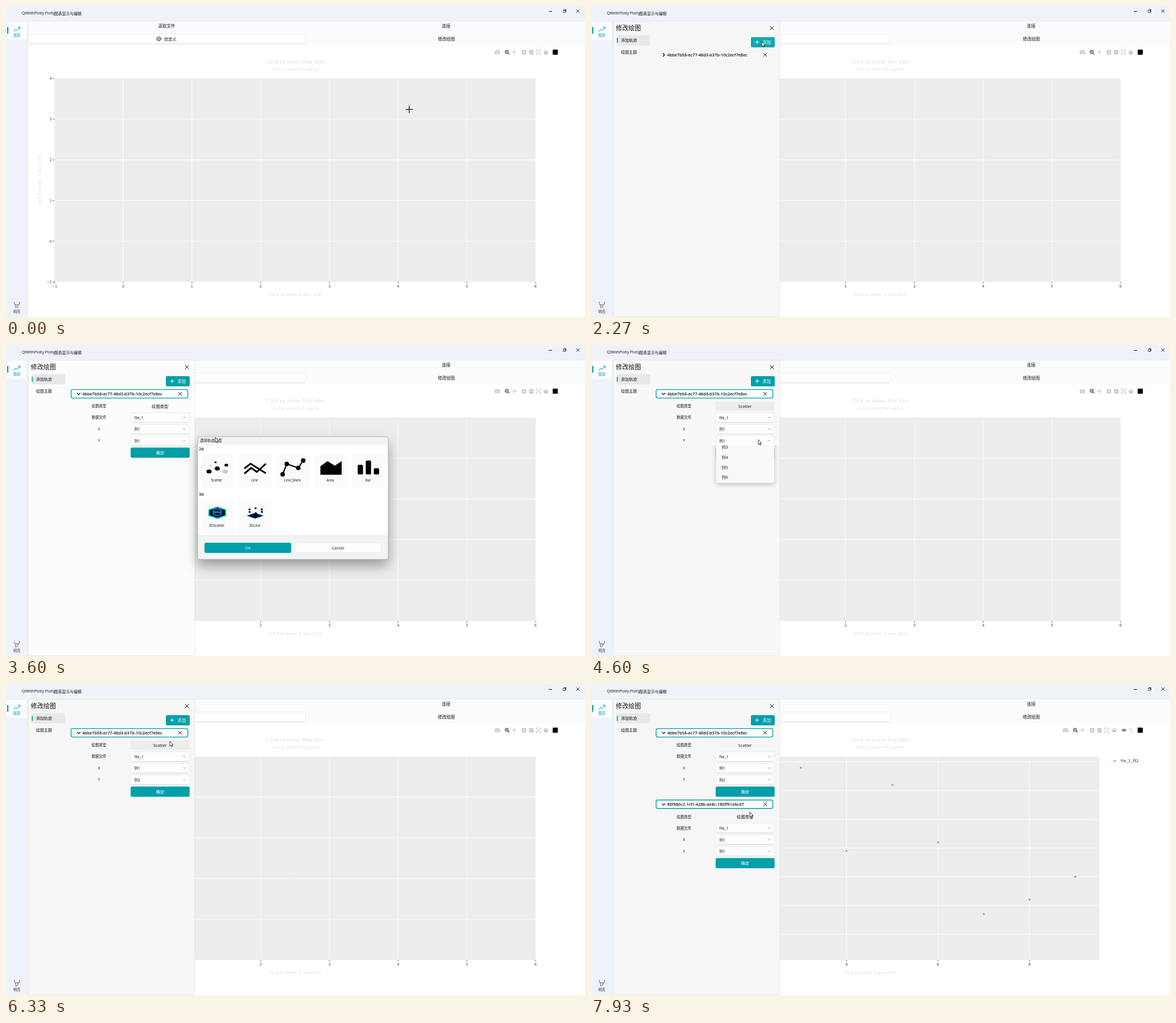
Animation, 1021 px wide and 549 px high, one loop 8 s. Source, as an HTML page with a canvas:

```html
<!DOCTYPE html>
<html lang="zh">
<head>
<meta charset="utf-8">
<title>QtWithPlotly</title>
<style>
  html, body { margin: 0; width: 100%; height: 100%; overflow: hidden; background: #fff; }
  canvas { display: block; width: 100%; height: 100%; }
</style>
</head>
<body>
<canvas id="stage" width="1021" height="549"></canvas>
<script>
const ctx = document.getElementById('stage').getContext('2d');
const DURATION = 8000;
const UI = '"Open Sans","Noto Sans","Noto Sans CJK SC",sans-serif';
const CHART = '"DejaVu Sans","Noto Sans CJK SC",sans-serif';
const INK = '#111', TEAL = '#009faa', TEAL_HOVER = '#0ba8b2', FAINT = '#dedede';

const PANEL_OPEN = 917, ADD_FIRST = 2270, EXPAND_FIRST = 2670, DIALOG_OPEN = 3270,
  DIALOG_CLOSE = 4050, MENU_OPEN = 4506, MENU_CLOSE = 5400, DATA_SHOWN = 6600,
  ADD_SECOND = 7070, EXPAND_SECOND = 7500;

// Pointer gestures: start time, end time, destination.
const POINTER_START = [711, 182];
const GESTURES = [
  [130, 730, 784, 57], [866, 930, 526, 88], [930, 1400, 57, 61], [1730, 2130, 301, 63],
  [2300, 2530, 262, 90], [2700, 3130, 288, 107], [3300, 3600, 369, 163], [3640, 3900, 428, 356],
  [4000, 4350, 295, 167], [4930, 5250, 273, 203], [5500, 5720, 272, 191], [5870, 6330, 289, 101],
  [6470, 6930, 300, 62], [7100, 7400, 268, 211], [7560, 7930, 280, 226]
];

const easeOut = (t, start, length, power = 2) =>
  1 - (1 - Math.min(1, Math.max(0, (t - start) / length))) ** power;
const pointerAt = t => GESTURES.reduce(([x, y], [start, end, toX, toY]) => {
  const p = easeOut(t, start, end - start);
  return [x + (toX - x) * p, y + (toY - y) * p];
}, POINTER_START);
const during = (t, start, end) => t >= start && t < end;
const inside = ([px, py], x, y, w, h) => px >= x && px <= x + w && py >= y && py <= y + h;

function text(s, x, y, size, { color = INK, align = 'left', weight = 400, font = UI } = {}) {
  ctx.font = `${weight} ${size}px ${font}`;
  ctx.textAlign = align;
  ctx.fillStyle = color;
  ctx.fillText(s, x, y + size * 0.37);
}
const centered = (s, x, y, size, color = INK) => text(s, x, y, size, { color, align: 'center' });
const chartText = (s, x, y, size, color = '#444', align = 'center') =>
  text(s, x, y, size, { color, align, font: CHART });

function paint({ fill, stroke, width = 1 }) {
  if (fill) { ctx.fillStyle = fill; ctx.fill(); }
  if (stroke) { ctx.strokeStyle = stroke; ctx.lineWidth = width; ctx.stroke(); }
}
function rect(x, y, w, h, fill, radius = 0, stroke, width = 0.7) {
  ctx.beginPath();
  ctx.roundRect(x, y, w, h, radius);
  paint({ fill, stroke, width });
}
function path(points, style) {
  ctx.beginPath();
  points.forEach(([x, y]) => ctx.lineTo(x, y));
  if (style.close) ctx.closePath();
  paint(style);
}
function ellipse(x, y, rx, ry, style) {
  ctx.beginPath();
  ctx.ellipse(x, y, rx, ry, 0, 0, Math.PI * 2);
  paint(style);
}
const dot = (x, y, r, fill) => ellipse(x, y, r, r, { fill });
const ring = (x, y, r, stroke, width) => ellipse(x, y, r, r, { stroke, width });
const line = (x1, y1, x2, y2, stroke, width) => path([[x1, y1], [x2, y2]], { stroke, width });
function plus(x, y, r, color = INK, width = 1) {
  line(x - r, y, x + r, y, color, width);
  line(x, y - r, x, y + r, color, width);
}
function cross(x, y, r, color = INK, width = 1) {
  line(x - r, y - r, x + r, y + r, color, width);
  line(x - r, y + r, x + r, y - r, color, width);
}
function chevron(x, y, r, down, stroke = '#777', width = 0.8) {
  const h = r / 2;
  path(down ? [[x - r, y - h], [x, y + h], [x + r, y - h]] : [[x - h, y - r], [x + h, y], [x - h, y + r]],
    { stroke, width });
}
function isolated(draw) {
  ctx.save();
  draw();
  ctx.restore();
}
function clipped(x, y, w, h, draw) {
  isolated(() => {
    ctx.beginPath();
    ctx.rect(x, y, w, h);
    ctx.clip();
    draw();
  });
}
function shadowed(blur, offset, alpha, draw) {
  isolated(() => {
    ctx.shadowColor = `rgba(0,0,0,${alpha})`;
    ctx.shadowBlur = blur;
    ctx.shadowOffsetY = offset;
    draw();
  });
}
function primaryButton(label, x, y, w, hovered) {
  rect(x, y, w, 18, hovered ? TEAL_HOVER : TEAL, 2.5);
  centered(label, x + w / 2, y + 9, 7.4, '#fff');
}

function drawWindow() {
  rect(0, 0, 1021, 549, '#eff3f9');
  text('QtWithPlotly Plotly', 28, 13, 6.7);
  text('图表显示与编辑', 85, 13, 6.9);
  line(957, 9.5, 963, 9.5, INK);
  rect(982.5, 7.5, 4, 4, null, 0.5, INK, 0.8);
  path([[983.5, 6.2], [987.5, 6.2], [987.5, 10.5]], { stroke: INK, width: 0.8 });
  cross(1008.5, 9, 2.8);

  rect(2, 28, 34.5, 31.5, '#fcfdfe', 3);
  rect(2, 37, 2.2, 12, TEAL, 1);
  path([[13.5, 45], [17, 41], [20, 43.2], [24.5, 37.5]], { stroke: TEAL });
  path([[21, 37.3], [24.7, 37.3], [24.7, 41]], { stroke: TEAL });
  centered('图表', 19.3, 52, 6.3, TEAL);
  path([[14.5, 522], [15.5, 527.5], [23, 527.5], [24, 522]], { stroke: '#444', width: 0.8 });
  path([[17, 528], [17, 533], [21, 531], [21, 528]], { stroke: '#444', width: 0.8 });
  centered('明亮', 19, 539.5, 6.3, '#333');

  rect(39, 26.5, 990, 530, '#f9fbfd', 4, '#e5e8ec', 0.8);
  rect(39.5, 70, 982, 480, '#fff');
  rect(39.5, 49.5, 489, 17, '#fff', 2.5, '#e2e4e7');
  line(41, 66.6, 527, 66.6, '#d2d4d6', 0.6);
  centered('读取文件', 283.3, 35.7, 7.5);
  centered('连接', 776.3, 35.7, 7.5);
  centered('修改绘图', 776.4, 58, 7.5);
  text('自定义', 278.5, 58, 7.4);
  ctx.setLineDash([1.7, 1.1]);
  ring(269.5, 58, 3.8, '#222', 1);
  ctx.setLineDash([]);
  ring(269.5, 58, 3.1, '#222', 0.7);
  ring(269.5, 58, 1.3, '#222', 0.7);
}

function drawModebar(withData) {
  const grey = '#c5c5c5', dark = '#6a6a6a', y = 81.5;
  isolated(() => {
    if (withData) ctx.translate(-29.5, 0);
    rect(862, 79, 9, 6, grey, 1);
    rect(864.5, 78, 4, 2, grey);
    ellipse(866.5, 82, 1.8, 1.8, { fill: grey, stroke: '#fff' });
    ring(883, 81, 2.7, dark, 1.5);
    plus(883, 81, 1.5, dark, 0.8);
    line(885, 83, 887.5, 85.5, dark, 1.7);
    plus(896.5, y, 4.3, grey, 1.1);
    for (const x of [913.3, 926.3]) {
      rect(x - 3.8, 78, 7.5, 7.5, grey, 0.8);
      line(x - 2.3, 81.7, x + 2.3, 81.7, '#fff', 1.1);
    }
    line(913.3, 79.4, 913.3, 84, '#fff', 1.1);
    cross(939, y, 3, grey);
    for (const a of [-1, 1]) for (const b of [-1, 1])
      path([[939 + a * 4, y + b * 1.5], [939 + a * 4, y + b * 4], [939 + a * 1.5, y + b * 4]], { stroke: grey });
    path([[947.8, 81.8], [952, 78], [956.2, 81.8]], { stroke: grey, width: 1.2 });
    rect(949, 81, 6, 4.3, grey);
  });
  if (withData) {
    path([[935, y], [937.5, 79.3], [943.5, 79.3], [943.5, 83.7], [937.5, 83.7]], { fill: '#8a8a8a' });
    path([[948, 79.5], [953.5, 79.5], [953.5, 85]], { stroke: grey });
  }
  rect(964, 77, 9, 9, '#000', 1);
}

const EMPTY_PLOT = {
  right: 934, xTicks: [-1, 0, 1, 2, 3, 4, 5, 6], yTicks: [-1, 0, 1, 2, 3, 4], values: [],
  xAt: v => 206.7 + v * 121.2, yAt: v => 415.2 - v * 71.8
};
const DATA_PLOT = {
  right: 896.5, xTicks: [2, 4, 6, 8], yTicks: [0, 10, 20, 30, 40, 50, 60], values: [58, 29, 52, 32, 7, 12, 20],
  xAt: v => 127.7 + v * 80.7, yAt: v => 441.5 - v * 5.065
};

function drawChart({ right, xTicks, yTicks, values, xAt, yAt }) {
  const left = 85.5, top = 128, bottom = 487;
  const label = v => String(v).replace('-', '−');
  rect(left, top, right - left, bottom - top, '#ededed');
  clipped(left + 1, top + 1, right - left - 2, bottom - top - 2, () => {
    for (const v of xTicks) line(xAt(v), top, xAt(v), bottom, '#fff', 0.9);
    for (const v of yTicks) line(left, yAt(v), right, yAt(v), '#fff', 0.9);
  });
  for (const v of xTicks) {
    line(xAt(v), bottom, xAt(v), bottom + 2.7, '#333', 0.8);
    chartText(label(v), xAt(v), 495, 6.5);
  }
  for (const v of yTicks) {
    line(left - 3, yAt(v), left, yAt(v), '#333', 0.8);
    chartText(label(v), 81, yAt(v), 6.5, '#444', 'right');
  }
  values.forEach((v, i) => dot(xAt(i + 3), yAt(v), 1.7, '#f8766d'));
  if (values.length) {
    dot(923.5, 136, 1.7, '#f8766d');
    chartText('file_1_列2', 934, 136, 6.6, '#333', 'left');
  }
  chartText('Click to enter Plot title', 509.7, 98.5, 9.1, FAINT);
  chartText('Click to enter Plot subtitle', 509.7, 111.3, 6.4, FAINT);
  chartText('Click to enter X axis title', (left + right) / 2, 509.5, 7.5, FAINT);
  isolated(() => {
    ctx.translate(59.5, 307.5);
    ctx.rotate(-Math.PI / 2);
    chartText('Click to enter Y axis title', 0, 0, 7.5, FAINT);
  });
  drawModebar(values.length > 0);
}

function comboBox(label, value, y) {
  centered(label, 164, y, 6.5);
  rect(220, y - 8.5, 103.3, 17, '#fdfdfd', 2.5, '#e4e4e4');
  line(222, y + 8.5, 321, y + 8.5, '#d0d0d0', 0.6);
  text(value, 226, y + 0.3, 6.8);
  chevron(314.5, y, 2, true);
}

// One trace card; `open` runs from 0 (collapsed) to 1 (expanded).
function drawCard(top, id, open, { type = '绘图类型', yColumn = '列1', typeHover, okHover }) {
  isolated(() => {
    ctx.translate(0, top);
    if (open > 0) {
      rect(114.8, 0.6, 205.8, 15, '#fdfdfd', 3, TEAL, 1.4);
      clipped(110, 16.5, 220, 105 * open, () => {
        ctx.translate(0, -105 * (1 - open));
        if (typeHover) rect(220, 22, 103.5, 16, '#ededed', 2.5);
        centered('绘图类型', 164, 30, 6.5);
        centered(type, 271.7, 30.3, 7.3);
        comboBox('数据文件', 'file_1', 50);
        comboBox('X', '列1', 70.5);
        comboBox('Y', yColumn, 91);
        primaryButton('确定', 219.8, 103, 104, okHover);
      });
    }
    chevron(128.2, 8.2, 3, open > 0, INK, 1.3);
    text(id, 134.3, 8.2, 7.3, { weight: 600 });
    cross(307.2, 8.2, 3.1);
  });
}

function drawPanel(t, pointer, dialogOpen, menuOpen) {
  const idle = dialogOpen || !inside(pointer, 39, 26, 294, 523);
  const fill = idle ? '#fcfcfc' : menuOpen ? '#f8f8f8' : '#f6f6f6';
  clipped(39, 26, 300, 523, () => {
    ctx.translate(-294 * (1 - easeOut(t, PANEL_OPEN, 250, 3)), 0);
    rect(39.3, 26.6, 293.7, 522, fill, 3, '#e2e2e2', 0.8);
    text('修改绘图', 43.8, 39.3, 11.1, { weight: 500 });
    cross(319, 39, 3.4);
    rect(45.5, 51.5, 59, 18, '#e8e8e8', 2.5);
    rect(45.5, 56, 1.8, 9, TEAL, 0.9);
    text('添加轨迹', 53, 60.7, 7);
    text('绘图主题', 53, 81.5, 7);
    primaryButton('', 282, 55, 42, inside(pointer, 282, 55, 42, 18));
    plus(293, 63.8, 3.6, '#fff');
    text('添加', 302.3, 64, 7.5, { color: '#fff' });
    if (t >= ADD_FIRST)
      drawCard(78, '4bbe7b58-ec77-48d3-b37b-10c2ecf7e8ec', easeOut(t, EXPAND_FIRST, 200), {
        type: t < DIALOG_CLOSE ? undefined : 'Scatter',
        yColumn: t < MENU_CLOSE ? '列1' : '列2',
        typeHover: during(t, DIALOG_CLOSE, MENU_CLOSE) || inside(pointer, 220, 100, 103, 16) && t > MENU_CLOSE,
        okHover: during(t, MENU_CLOSE, ADD_SECOND) && inside(pointer, 220, 181, 104, 18)
      });
    if (t >= ADD_SECOND)
      drawCard(204.2, '86f980c2-1cf1-428b-ae8c-185ff91a5cd7', easeOut(t, EXPAND_SECOND, 200), {});
  });
}

function drawMenu(t, pointer) {
  clipped(205, 177, 135, 130, () => {
    ctx.translate(0, -108 * (1 - easeOut(t, MENU_OPEN, 250)));
    shadowed(10, 3, 0.22, () => rect(220.3, 177, 103, 108, '#f9f9f9', 4));
    rect(220.3, 177, 103, 108, null, 4, '#dedede', 0.6);
    for (let i = 0; i < 6; i++) {
      const y = 187 + i * 17.6;
      if (inside(pointer, 220, y - 8.8, 103, 17.6)) rect(223, y - 8, 97.5, 16, '#eeeeee', 2.5);
      text('列' + (i + 1), 230.3, y, 7.2);
    }
  });
}

// Icons are drawn around the origin.
const TRACE_ICONS = {
  Scatter() {
    const blobs = [[-11, -4, 2], [-3, -10, 2], [16, -5, 3.3], [0, 1, 4.7], [-14.5, 6.3, 4.5], [14, 6.3, 4.8]];
    blobs.forEach(([x, y, r], i) => ellipse(x, y, r, r * 0.78, { fill: i % 5 ? '#000' : '#ccc' }));
  },
  Line() {
    path([[-19, 1], [-8, -7.5], [19, 9.5]], { stroke: '#000', width: 3 });
    path([[-19, 10], [-7, 0], [3, 7], [19, -7.5]], { stroke: '#000', width: 3 });
  },
  Line_Mark() {
    const points = [[-18.3, 11.3], [-11, -7], [9.3, 0], [18, -13]];
    path(points, { stroke: '#000', width: 2.2 });
    points.forEach(([x, y]) => dot(x, y, 4, '#000'));
  },
  Area() {
    path([[-18.5, 12], [-18.5, -3], [-6, -12], [7, -4], [19, -12], [19, 12]], { fill: '#000' });
  },
  Bar() {
    [17, 24.5, 11].forEach((h, i) => rect(-19.5 + i * 14.2, 11.5 - h, 9.3, h, '#000', 2));
  },
  '3DScatter'() {
    const corners = Array.from({ length: 6 }, (_, i) =>
      [15 * Math.sin(i * Math.PI / 3) * 1.15, -1 - 10.3 * Math.cos(i * Math.PI / 3)]);
    path(corners, { fill: '#06121c', stroke: '#00e5f0', width: 2, close: true });
    for (const y of [-5, 1]) ellipse(0, y, 7, 2.7, { stroke: '#2b8cff', width: 1.2 });
    for (const x of [-7, 7]) line(x, -5, x, 1, '#2b8cff', 1.2);
  },
  '3DLine'() {
    path([[0, -0.5], [14.5, 4.3], [0, 9.3], [-14.5, 4.3]], { fill: '#000', stroke: '#2b8cff', close: true });
    for (let i = 0; i < 6; i++) dot(1 + 12.5 * Math.cos(i * 1.05 + 0.5), -4.5 + 4.5 * Math.sin(i * 1.05 + 0.5), 1.8, '#000');
  }
};

function drawDialog(pointer) {
  shadowed(22, 11, 0.36, () => rect(338, 162, 336, 216.5, '#f3f3f3', 4));
  rect(338, 176.5, 336, 160, '#fff');
  line(338, 336.5, 674, 336.5, '#e3e3e3', 0.8);
  rect(338, 162, 336, 216.5, null, 4, '#a9a9a9', 0.8);
  text('选择轨迹类型', 342, 169, 6.5);
  text('2d', 340.3, 183.3, 7, { weight: 600 });
  text('3d', 340.3, 263.5, 7, { weight: 600 });
  Object.entries(TRACE_ICONS).forEach(([name, icon], i) => {
    const x = 343.5 + (i % 5) * 66.8, y = i < 5 ? 194 : 274;
    rect(x, y, 58, 57.5, inside(pointer, x, y, 58, 57) ? '#f0f0f0' : '#fbfbfb', 3);
    isolated(() => {
      ctx.translate(x + 29, y + 23);
      icon();
    });
    centered(name, x + 28, y + 44.3, 6.2);
  });
  primaryButton('OK', 350, 349, 153, inside(pointer, 350, 349, 153, 18));
  rect(509.7, 349.5, 152, 17, '#fefefe', 2.5, '#e2e2e2');
  centered('Cancel', 585.5, 358, 7);
}

function drawPointer([x, y], overPlot) {
  if (overPlot) return plus(x, y + 0.5, 6.3, INK, 1.3);
  const arrow = [[0, 0], [0, 8.8], [2, 7], [3.3, 9.9], [4.6, 9.3], [3.4, 6.5], [6, 6.3]];
  path(arrow.map(([dx, dy]) => [x + dx, y + dy]), { fill: '#fff', stroke: INK, width: 0.8, close: true });
}

function frame(now) {
  const t = now % DURATION, pointer = pointerAt(t);
  const dialogOpen = during(t, DIALOG_OPEN, DIALOG_CLOSE), menuOpen = during(t, MENU_OPEN, MENU_CLOSE);
  drawWindow();
  drawChart(t < DATA_SHOWN ? EMPTY_PLOT : DATA_PLOT);
  if (t >= PANEL_OPEN) drawPanel(t, pointer, dialogOpen, menuOpen);
  if (menuOpen) drawMenu(t, pointer);
  if (dialogOpen) drawDialog(pointer);
  drawPointer(pointer, t < PANEL_OPEN && pointer[1] > 128);
  requestAnimationFrame(frame);
}
requestAnimationFrame(frame);
</script>
</body>
</html>
```
